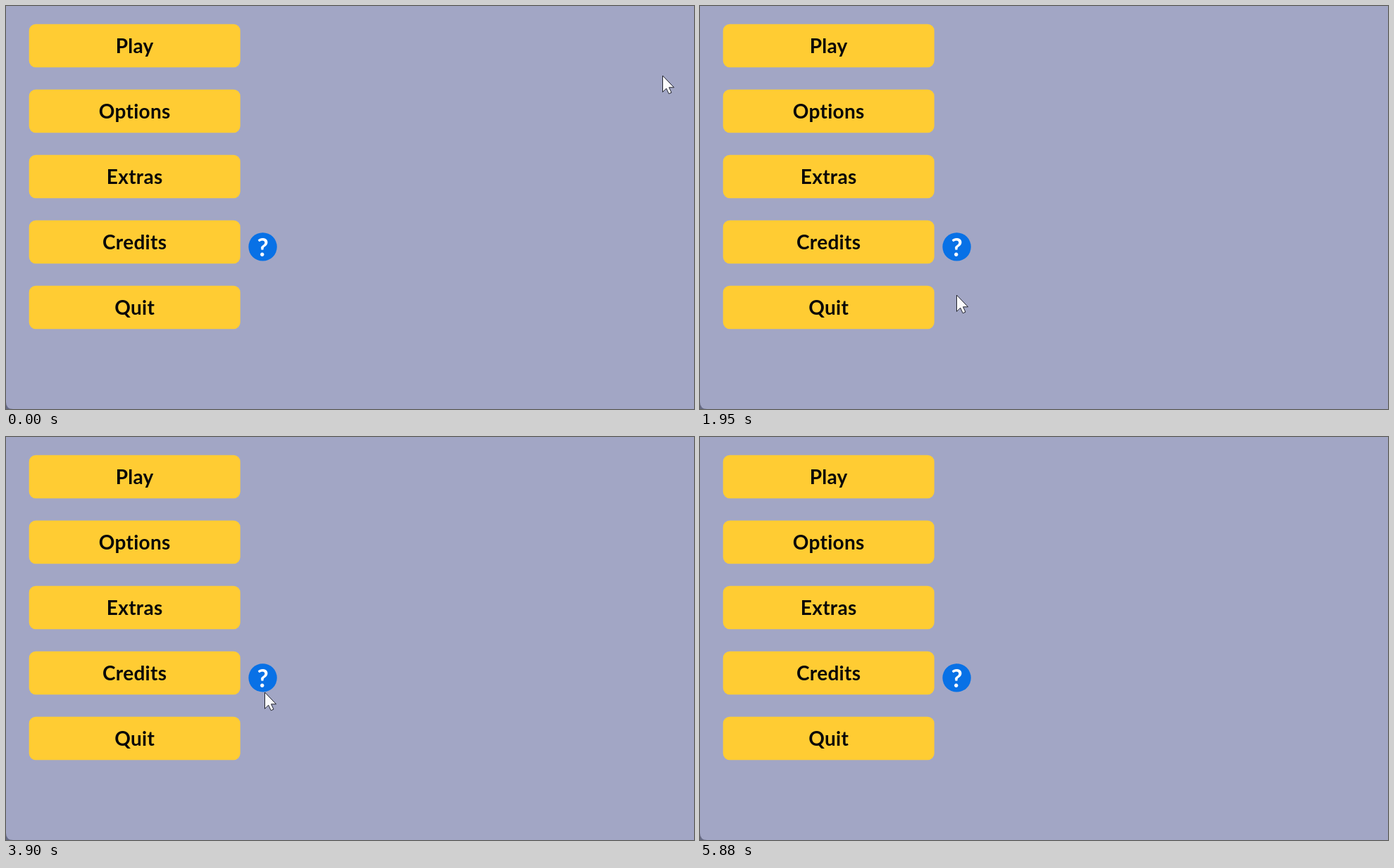
An HTML page that plays this animation: 977 px wide and 573 px high, repeating every 6060 ms.

```html
<!DOCTYPE html>
<html lang="en">
<head>
<meta charset="utf-8">
<title>Menu tooltip</title>
<style>
  html, body { margin: 0; width: 100%; height: 100%; overflow: hidden; background: #a2a6c5; }
  svg { display: block; width: 977px; height: 573px; }
  text { font-family: Lato, sans-serif; font-size: 28px; font-variant-ligatures: none; }
  .label { font-weight: 700; text-anchor: middle; letter-spacing: .3px; }
  .mark { font-size: 35.5px; letter-spacing: 0; }
</style>
</head>
<body>
<svg viewBox="0 0 977 573">
  <rect width="977" height="573" fill="#a2a6c5"/>
  <path d="M0 563Q0 573 10 573H0Z" fill="#666a84"/>
  <g id="menu"></g>
  <circle cx="364.6" cy="342.4" r="20.2" fill="#0871e6"/>
  <text class="label mark" x="364.6" y="356.2" fill="#fff">?</text>
  <g id="tip">
    <path d="M395 343.5L410.5 326V361Z" fill="#1d4877"/>
    <rect x="410" y="296.5" width="252" height="92" rx="9" fill="#1d4877"/>
    <text x="420.8" y="353.2" fill="#f4f6fa">The team at Bulvra</text>
  </g>
  <path id="cursor" d="M.5 1V24.4L5.7 19.2L9.3 26.8L13 25.1L9.6 17.8H16.6Z"
        fill="#fafafc" stroke="#20222c" stroke-linejoin="round"/>
</svg>
<script>
const LOOP = 6060, STEP = 30;
const START = { x: 932, y: 98 };
const HOTSPOT = { x: 364.6, y: 342.4, radius: 17.5 };
const tip = document.getElementById('tip');
const cursor = document.getElementById('cursor');

// Pointer moves: start, end, x, y
const moves = [
  [0, 330, 410, 446], [330, 540, 357, 342],
  [810, 1110, 358, 428], [1140, 1470, 358, 338],
  [1500, 2070, 365, 419], [2280, 2730, 367, 360], [2730, 2850, 372, 357],
  [3600, 3690, 367, 362], [4110, 4270, 366, 362],
  [4270, 4380, 376, 338], [4380, 4530, 365, 342],
  [4860, 5460, 520, 356], [5460, 5880, 980, 74]
];

document.getElementById('menu').innerHTML = ['Play', 'Options', 'Extras', 'Credits', 'Quit']
  .map((name, i) => {
    const y = 25.8 + 93 * i;
    return `<rect x="32.7" y="${y}" width="300" height="61.4" rx="9.5" fill="#ffcc33"/>
      <text class="label" x="182.7" y="${y + 41.4}" fill="#080808">${name}</text>`;
  }).join('');

const ease = u => u * u * (3 - 2 * u);

function pointer(t) {
  let { x, y } = START;
  for (const [start, end, toX, toY] of moves) {
    if (t < start) break;
    const u = ease(Math.min(1, (t - start) / (end - start)));
    x += (toX - x) * u;
    y += (toY - y) * u;
  }
  return { x, y };
}

function hovered(t) {
  const { x, y } = pointer(t);
  return Math.hypot(x - HOTSPOT.x, y - HOTSPOT.y) < HOTSPOT.radius;
}

// Each step the tooltip covers half the way to shown or hidden.
function opacity(t) {
  let value = 0;
  for (let s = 0; s <= t; s += STEP) value += (hovered(s) - value) / 2;
  return value < .01 ? 0 : value;
}

function draw(now) {
  const t = Math.floor((now % LOOP) / STEP) * STEP;
  const { x, y } = pointer(t);
  tip.setAttribute('opacity', opacity(t));
  cursor.setAttribute('transform', `translate(${Math.round(x)} ${Math.round(y)})`);
}

let begin;
function tick(now) {
  begin ??= now;
  draw(now - begin);
  requestAnimationFrame(tick);
}
draw(0);
requestAnimationFrame(tick);
</script>
</body>
</html>
```
